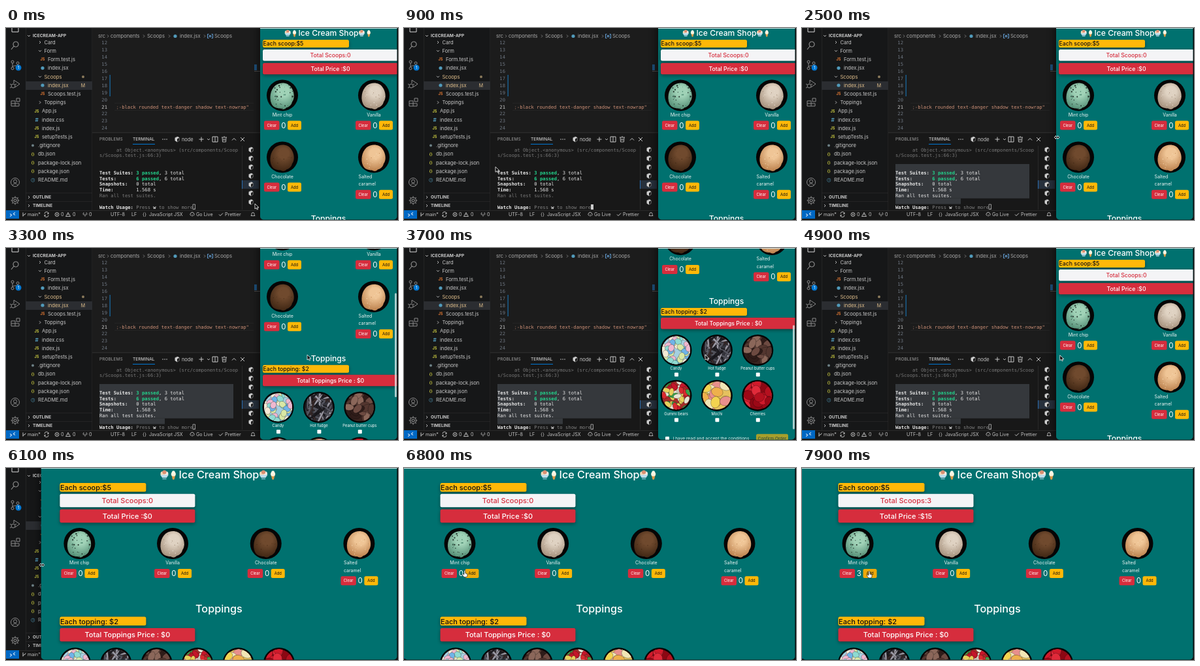
These frames come from a looping animation (600x295 px, 8 s). An HTML page with a canvas:

```html
<!DOCTYPE html>
<html lang="en">
<head>
<meta charset="utf-8">
<style>
html, body { margin: 0; width: 100%; height: 100%; overflow: hidden; background: #000; }
canvas { display: block; width: 600px; height: 295px; }
</style>
</head>
<body>
<canvas id="stage"></canvas>
<script>
const LOOP = 8000;
const SANS = 'Inter, "Liberation Sans", sans-serif';
const MONO = '"DejaVu Sans Mono", "Liberation Mono", monospace';
const TEAL = '#00716f', RED = '#d62d3d', YELLOW = '#ffb808', GREY = '#c5c5c5';
const canvas = document.getElementById('stage');
const c = canvas.getContext('2d');
const ratio = window.devicePixelRatio || 1;
canvas.width = 600 * ratio;
canvas.height = 295 * ratio;

const lerp = (a, b, k) => a + (b - a) * k;
const clamp = v => Math.max(0, Math.min(1, v));

function random(seed) {
  return () => (seed = (seed * 16807) % 2147483647) / 2147483647;
}

function text(s, x, y, size, color, { align = 'left', weight = 400, font = SANS } = {}) {
  c.font = `${weight} ${size}px ${font}`;
  c.textAlign = align;
  c.textBaseline = 'alphabetic';
  c.fillStyle = color;
  c.fillText(s, x, y + size * 0.36);
}

function rect(x, y, w, h, color, r = 0) {
  c.fillStyle = color;
  c.beginPath();
  c.roundRect(x, y, w, h, r);
  c.fill();
}

function disc(x, y, r, color) {
  c.fillStyle = color;
  c.beginPath();
  c.arc(x, y, r, 0, 7);
  c.fill();
}

function path(d, x, y, stroke, fill, width = 1) {
  const p = new Path2D(d);
  c.save();
  c.translate(x, y);
  c.lineWidth = width;
  if (fill) { c.fillStyle = fill; c.fill(p); }
  if (stroke) { c.strokeStyle = stroke; c.stroke(p); }
  c.restore();
}

function chevron(x, y, open, color = GREY) {
  path(open ? 'M-2-1L0 1L2-1' : 'M-1-2L1 0L-1 2', x, y, color, null, 0.9);
}

function cube(x, y) {
  path('M0-4L3.2-2.4V2L0 4L-3.2 2V-2.4Z', x, y, '#a5a5a5', '#181818', 0.6);
  path('M-3.2-2.2L1-4L3.2-2.4L0-.6V4L-3.2 2Z', x, y, null, '#d0d0d0');
}

// ---- Editor ----
// depth, icon, name, colour
const FILES = [
  [1, '>', 'Card'], [1, 'v', 'Form'], [2, 'test', 'Form.test.js'], [2, 'jsx', 'index.jsx'],
  [1, 'v', 'Scoops', '#e2c08d'], [2, 'jsx', 'index.jsx', '#e2c08d'], [2, 'test', 'Scoops.test.js'],
  [1, '>', 'Toppings'], [1, 'js', 'App.js'], [1, 'css', 'index.css'], [1, 'js', 'index.js'],
  [1, 'js', 'setupTests.js'], [0, 'dot', '.gitignore'], [0, 'json', 'db.json'],
  [0, 'json', 'package-lock.json'], [0, 'json', 'package.json'], [0, 'info', 'README.md']
];
const GLYPHS = {
  test: ['JS', '#e37933'], js: ['JS', '#cbcb41'], css: ['#', '#519aba'],
  json: ['{}', '#cbcb41'], info: ['ⓘ', '#519aba']
};

function activityBar() {
  const g = '#8b8b8b';
  path('M-5-6H2L5-3V3H-5Z', 14, 3, '#d7d7d7');
  path('M5-2A4 4 0 1 1-3-2A4 4 0 1 1 5-2M-2 1L-6 6', 14, 27, g, null, 1.2);
  path('M-2-5A2 2 0 1 1-6-5A2 2 0 1 1-2-5M-2 5A2 2 0 1 1-6 5A2 2 0 1 1-2 5M6-3A2 2 0 1 1 2-3A2 2 0 1 1 6-3M-4-3V3M4-1C4 2-4 0-4 3', 14, 57, g);
  disc(19, 61, 4.5, '#0078d4');
  text('1', 19, 61, 6, '#fff', { align: 'center' });
  path('M-2-1V-6L7 0L0 5M0 3A3 3 0 1 1-6 3A3 3 0 1 1 0 3M-8 0L-6 1M-8 6L-6 5M2 0L0 1', 14, 86, g);
  path('M-6-2H0V6H-6ZM-6 2H6V6H0M2-6H7V-1H2Z', 14, 114, g);
  path('M6.5 0A6.5 6.5 0 1 1-6.5 0A6.5 6.5 0 1 1 6.5 0M2.5-1.5A2.5 2.5 0 1 1-2.5-1.5A2.5 2.5 0 1 1 2.5-1.5M-4 5C-3 1 3 1 4 5', 14, 237, g);
  path('M2 0A2 2 0 1 1-2 0A2 2 0 1 1 2 0M4.5 0A4.5 4.5 0 1 1-4.5 0A4.5 4.5 0 1 1 4.5 0M0-6.5V-4.5M0 6.5V4.5M6.5 0H4.5M-6.5 0H-4.5M-4.6-4.6L-3.2-3.2M4.6 4.6L3.2 3.2M-4.6 4.6L-3.2 3.2M4.6-4.6L3.2-3.2', 14, 265, g, null, 1.2);
}

function sidebar() {
  rect(30, 82, 102, 13, '#2b2d31');
  chevron(35, 12, true);
  text('ICECREAM-APP', 41, 12, 6.6, '#ccc', { weight: 700 });
  FILES.forEach(([depth, icon, name, color = '#c8c8c8'], i) => {
    const y = 22 + i * 13.2, x = 41 + depth * 6 + (depth === 2 ? 3 : 0);
    if (icon === '>' || icon === 'v') {
      chevron(52, y, icon === 'v');
      text(name, 58.5, y, 7.6, color);
      return;
    }
    if (icon === 'jsx') disc(x, y, 2.6, '#519aba');
    else if (icon === 'dot') disc(x, y, 2, '#6d8086');
    else text(GLYPHS[icon][0], x, y, icon === 'css' ? 8 : 5.6, GLYPHS[icon][1], { align: 'center', weight: 700 });
    text(name, x + 8, y, 7.6, color);
  });
  disc(118, 75, 2, '#8b7a5c');
  text('M', 118, 88, 7, '#e2c08d', { align: 'center' });
  rect(30, 253, 102, 0.6, '#333');
  rect(30, 266.5, 102, 0.6, '#333');
  ['OUTLINE', 'TIMELINE'].forEach((s, i) => {
    chevron(35, 260 + i * 13, false);
    text(s, 41, 260 + i * 13, 6.4, '#ccc', { weight: 700 });
  });
}

function codePane() {
  rect(132, 0, 257, 161, '#1c1c1c');
  [['src', 141], ['components', 160], ['Scoops', 216], ['index.jsx', 266], ['Scoops', 319]]
    .forEach(([s, x]) => text(s, x, 12.5, 7.6, '#a9a9a9'));
  [156, 211, 250, 304].forEach(x => chevron(x, 12.5, false, '#888'));
  disc(259, 12.5, 2.6, '#519aba');
  path('M-2-3H-4V3H-2M2-3H4V3H2M-1.5-1H1.5V1H-1.5Z', 312.5, 12.5, '#75beff', null, 0.8);
  for (let n = 12; n <= 24; n++)
    text(n, 155, 121 + (n - 21) * 10.9, 7.2, n === 21 ? '#ccc' : '#6e7681', { align: 'right', font: MONO });
  rect(158.5, 72, 1.4, 33, '#1a6296');
  rect(166, 115.5, 213, 0.6, '#2c2c2c');
  rect(166, 126.5, 213, 0.6, '#2c2c2c');
  text(';-black rounded text-danger shadow text-nowrap"', 168.5, 121, 7.2, '#ce9178', { font: MONO });
  rect(168, 116, 2.5, 10, '#1c1c1c');
  rect(380, 56, 4, 9, '#1d4f7a');
  rect(380, 66, 9, 0.8, '#555');
}

function terminal(t, mouse) {
  rect(132, 161, 257, 119, '#181818');
  rect(132, 160.5, 257, 0.8, '#3a3a3a');
  text('PROBLEMS', 143, 171, 6.6, '#9d9d9d');
  text('TERMINAL', 194, 171, 6.6, '#e7e7e7');
  rect(194, 178, 34, 1, '#0078d4');
  [240, 243, 246].forEach(x => disc(x, 171, 0.8, GREY));
  cube(262, 171);
  text('node', 269, 171, 7.4, GREY);
  path('M-3.5 0H3.5M0-3.5V3.5', 299, 171, GREY);
  chevron(310, 171, true);
  path('M-4-4H4V4H-4ZM0-4V4', 320, 171, GREY);
  path('M-4-3H4M-3-3L-2.5 4H2.5L3-3M-1-4H1M-1-1V2M1-1V2', 334, 171, GREY, null, 0.9);
  path('M-3 1.5L0-1.5L3 1.5', 349, 171, GREY);
  path('M-3-3L3 3M3-3L-3 3', 362, 171, GREY);
  rect(361, 181, 0.7, 98, '#303030');
  rect(361, 234, 26, 13, '#26303c');
  rect(361, 234, 1, 13, '#2a6db0');
  for (let i = 0; i < 7; i++) cube(375, 187 + i * 13.4);

  const top = 182.6, pitch = 8.8;
  const drag = t >= 1000;
  const end = t < 1700 ? { x: mouse.x, row: Math.floor((mouse.y - top) / pitch) } : { x: 243, row: 9 };
  if (drag) {
    rect(143, top + 3 * pitch, 205, Math.max(0, end.row - 3) * pitch, '#35383c');
    rect(143, top + end.row * pitch, Math.max(0, end.x - 143), pitch, '#35383c');
  }
  const row = (i, ...parts) => {
    let col = 0;
    for (const [s, color, weight = 400] of parts) {
      text(s, 143 + col * 4.335, 187 + i * pitch, 7.2, color, { font: MONO, weight });
      col += s.length;
    }
  };
  const white = '#e5e5e5', green = '#23d18b';
  row(0, ['      at Object.<anonymous> (src/components/Scoop', '#777']);
  row(1, ['s/Scoops.test.js:66:3)', '#777']);
  row(4, ['Test Suites: ', white, 700], ['3 passed', green, 700], [', 3 total', white]);
  row(5, ['Tests:       ', white, 700], ['6 passed', green, 700], [', 6 total', white]);
  row(6, ['Snapshots:   ', white, 700], ['0 total', white]);
  row(7, ['Time:        ', white, 700], ['1.568 s', white]);
  row(8, ['Ran all test suites.', drag && end.row > 8 ? white : '#777']);
  row(10, ['Watch Usage: ', white, 700], ['Press ', '#808080'], ['w', white, 700], [' to show more.', '#808080']);
  if (t > 850 && t < 2300) rect(286, 271, 4, 8, '#ccc');
  else path('M0 0H3.5V7.5H0Z', 286, 271, '#bbb', null, 0.8);
}

function statusBar() {
  rect(0, 280, 600, 15, '#181818');
  rect(0, 280, 389, 0.7, '#303030');
  rect(0, 280, 20, 13, '#0068c4');
  path('M-4-1L-1 1L-4 3M4-3L1-1L4 1', 10, 286.5, '#fff');
  path('M-2-3V3M2-2C2 1-2 0-2 2', 28, 286.5, GREY);
  text('main*', 33, 286.5, 7.2, GREY);
  path('M3-1A3 3 0 0 0-3-1M-3 1A3 3 0 0 0 3 1M3-3V-1H1M-3 3V1H-1', 62, 286.5, GREY, null, 0.9);
  path('M3 0A3 3 0 1 1-3 0A3 3 0 1 1 3 0M-1.3-1.3L1.3 1.3M1.3-1.3L-1.3 1.3', 78, 286.5, GREY, null, 0.9);
  path('M0-3L3.5 3H-3.5ZM0-1V1', 95, 286.5, GREY, null, 0.9);
  path('M0-1V3M-2-3A3 3 0 0 0-2 1M2-3A3 3 0 0 1 2 1', 121, 286.5, GREY, null, 0.9);
  [['0', 84], ['0', 102], ['0', 127], ['UTF-8', 160], ['LF', 192], ['{}', 209],
    ['JavaScript JSX', 219], ['Go Live', 291], ['Prettier', 335]]
    .forEach(([s, x]) => text(s, x, 286.5, 7.2, GREY));
  path('M0 3V0M-2 2A3 3 0 1 1 2 2', 285, 286.5, GREY, null, 0.9);
  path('M-3 0L-1 2L3-2', 329, 286.5, GREY);
  path('M-3 2H3L2 0V-1A2 2 0 0 0-2-1V0Z', 378, 286.5, GREY, null, 0.9);
}

// ---- Shop page ----
// name, light, shade, specks, speck size
const SCOOPS = [
  ['Mint chip', '#a0d2b7', '#4f8b72', '#26382f', 1.1],
  ['Vanilla', '#dfd2c2', '#a08b76', '#efe6da', 0.6],
  ['Chocolate', '#704a2e', '#3c2412', '#5e3b22', 0.6],
  ['Salted caramel', '#efc596', '#b87c48', '#f7dcb7', 0.6]
];
// name, backdrop, pieces, piece length, piece width
const TOPPINGS = [
  ['Candy', '#a5cfe0', ['#6fb4e8', '#f0b8cf', '#d9e8a5', '#f4ead5', '#8edbd2'], 5.5, 4.5],
  ['Hot fudge', '#34343c', ['#1d1b20', '#55555f', '#9a98a3', '#3b2c2c'], 11, 1.6],
  ['Peanut butter cups', '#3a231f', ['#2f1c19', '#6d4a41', '#8b675a', '#53362f'], 8, 5],
  ['Gummi bears', '#a62c2a', ['#d92a2f', '#3aa149', '#e9d05c', '#e8e4d4', '#c5162a'], 6, 3.5],
  ['Mochi', '#e5c15e', ['#f3d350', '#e88f8c', '#f1e6b5', '#efb04c'], 9, 7],
  ['Cherries', '#8c0713', ['#d01a2b', '#9c0816', '#e02a3a', '#b5101f'], 8, 7]
];
const SCOOP_SHAPE = new Path2D('M-17 12C-20 5-19-8-11-15C-3-21 8-20 13-13C19-5 19 5 15 10C14 15 10 18 6 19C4 22 0 22-3 20C-9 20-15 18-17 12Z');

function scoopPhoto(x, y, [, light, shade, speck, size], seed) {
  disc(x, y, 24, '#050505');
  c.save();
  c.translate(x, y);
  c.clip(SCOOP_SHAPE);
  const glow = c.createRadialGradient(2, -6, 8, 0, -2, 25);
  glow.addColorStop(0, light);
  glow.addColorStop(1, shade);
  c.fillStyle = glow;
  c.fillRect(-25, -25, 50, 50);
  const rnd = random(seed);
  for (let i = 0; i < 40; i++) disc(rnd() * 38 - 19, rnd() * 40 - 19, size * (0.4 + rnd() * 0.7), i % 3 ? speck : shade);
  c.restore();
}

function toppingPhoto(x, y, [, base, colors, length, width], seed) {
  disc(x, y, 24, '#050505');
  c.save();
  c.beginPath();
  c.arc(x, y, 21.5, 0, 7);
  c.clip();
  c.fillStyle = base;
  c.fillRect(x - 24, y - 24, 48, 48);
  c.strokeStyle = 'rgba(0,0,0,.3)';
  c.lineWidth = 0.9;
  const rnd = random(seed);
  for (let i = 0; i < 1100 / (length * width); i++) {
    c.fillStyle = colors[i % colors.length];
    c.beginPath();
    c.ellipse(x + rnd() * 42 - 21, y + rnd() * 42 - 21, length, width, rnd() * 3, 0, 7);
    c.fill();
    c.stroke();
  }
  c.restore();
}

function sundae(x, y, s) {
  disc(x - s * 0.17, y - s * 0.12, s * 0.22, '#f3d9b8');
  disc(x + s * 0.17, y - s * 0.12, s * 0.22, '#f6eee4');
  disc(x, y - s * 0.26, s * 0.2, '#d98f72');
  path(`M${-s * .42} 0H${s * .42}L${s * .22} ${s * .3}H${-s * .22}Z`, x, y, null, '#b9dbea');
  rect(x - s * 0.2, y + s * 0.36, s * 0.4, s * 0.08, '#9cc7da');
}

function cone(x, y, s) {
  path(`M${-s * .2} 0H${s * .2}L${s * .08} ${s * .48}H${-s * .08}Z`, x, y, null, '#dc9a48');
  disc(x, y - s * 0.08, s * 0.23, '#fbf3df');
  disc(x, y - s * 0.25, s * 0.16, '#fff8e8');
}

function bar(x, y, w, h, color) {
  c.save();
  c.shadowColor = 'rgba(0,0,0,.4)';
  c.shadowBlur = 5 * ratio;
  c.shadowOffsetY = 2 * ratio;
  rect(x, y, w, h, color, 2.5);
  c.restore();
}

function innerWidth(w) {
  if (w < 253) return w - 10;
  return w < 337 ? 226 : w < 435 ? 305 : w < 526 ? 410 : 489;
}

function shop(edge, scroll, count, hover) {
  const w = 600 - edge, inner = innerWidth(w), k = clamp((w - 211) / 315);
  const left = w < 253 ? edge + 4 : edge + (w - inner) / 2;
  const mid = edge + w / 2 - 1;
  const titleSize = lerp(12.1, 16.2, k), size = lerp(8.7, 11, k);
  const barH = lerp(17.5, 20.5, k), tagH = lerp(12, 13.5, k);
  const label = (s, y, color) => text(s, left + 103.5, y + barH / 2, size, color, { align: 'center', weight: 500 });
  const tag = (s, y) => {
    bar(left, y, 132, tagH, YELLOW);
    text(s, left + 0.5, y + tagH / 2 + 0.3, size, '#111', { weight: 500 });
  };

  c.save();
  c.shadowColor = 'rgba(0,0,0,.75)';
  c.shadowBlur = 14 * ratio;
  rect(edge, -8, 598.5 - edge, 302.5, TEAL, 5);
  c.restore();
  c.save();
  c.beginPath();
  c.roundRect(edge, -8, 598.5 - edge, 302.5, 5);
  c.clip();
  c.translate(0, -scroll);

  const titleY = lerp(8, 10.5, k);
  text('Ice Cream Shop', mid, titleY, titleSize, '#fff', { align: 'center', weight: 500 });
  const half = titleSize * 3.8, e = titleSize * 0.9;
  sundae(mid - half - e * 1.5, titleY, e * 1.05);
  cone(mid - half - e * 0.55, titleY, e * 1.05);
  sundae(mid + half + e * 0.45, titleY, e * 1.05);
  cone(mid + half + e * 1.45, titleY, e * 1.05);

  tag('Each scoop:$5', lerp(18, 23, k));
  const totalY = lerp(33, 39.7, k), priceY = lerp(53.7, 63.6, k);
  bar(left, totalY, 207, barH, '#f4f4f6');
  label('Total Scoops:' + count, totalY, RED);
  bar(left, priceY, 207, barH, RED);
  label('Total Price :$' + count * 5, priceY, '#fff');

  const perRow = Math.min(4, Math.floor(inner / 70));
  const gap = (inner - 61) / (perRow - 1);
  const firstY = lerp(103.5, 116, k);
  let photoY;
  SCOOPS.forEach((scoop, i) => {
    const x = left + (i % perRow) * gap;
    photoY = firstY + Math.floor(i / perRow) * 95;
    scoopPhoto(x + 30, photoY, scoop, 31 + i * 977);
    let y = photoY + 29.8;
    if (i === 3) {
      text('Salted', x + 6.5, y, 7, '#eef5f4');
      y += 11.2;
      text('caramel', x + 6.5, y, 7, '#eef5f4');
    } else text(scoop[0], x + 30, y, 7, '#eef5f4', { align: 'center' });
    y += 16.3;
    rect(x + 2, y - 7, 23.5, 14, RED, 2.5);
    text('Clear', x + 13.7, y, 5.8, '#fff', { align: 'center' });
    text(i ? 0 : count, x + 31.8, y, 11.5, '#fff', { align: 'center' });
    rect(x + 38, y - 7, 21, 14, !i && hover ? '#eda90b' : YELLOW, 2.5);
    text('Add', x + 48.5, y, 5.8, '#111', { align: 'center' });
  });

  const headY = photoY + lerp(94.5, 100.5, k);
  text('Toppings', mid, headY, titleSize, '#fff', { align: 'center', weight: 500 });
  tag('Each topping: $2', headY + lerp(10.5, 12, k));
  const sumY = headY + lerp(25.5, 29.5, k);
  bar(left, sumY, 207, barH, RED);
  label('Total Toppings Price : $0', sumY, '#fff');

  const across = Math.min(6, Math.floor(inner / 62.4));
  let y;
  TOPPINGS.forEach((topping, i) => {
    const x = left + 23.5 + (i % across) * 62.4;
    y = headY + lerp(75.5, 83.5, k) + Math.floor(i / across) * 69.7;
    toppingPhoto(x, y, topping, 53 + i * 1409);
    text(topping[0], x, y + 28.3, 5.8, '#fff', { align: 'center' });
    rect(x - 2.5, y + 34.5, 6, 6, '#fff', 1);
  });
  rect(left + 7, y + 63, 6, 6, '#fff', 1);
  text('I have read and accept the conditions', left + 18.5, y + 66, 6.6, '#e4efee');
  rect(left + 146, y + 59, 49, 14, '#a69f2c', 2.5);
  text('Confirm Order', left + 170.5, y + 66, 6.4, '#26413b', { align: 'center' });
  c.restore();
  if (scroll > 0) rect(595, scroll * 0.56, 3, 160, 'rgba(225,235,235,.75)', 1.5);
  rect(edge, 0, 598.5 - edge, 1, '#d5e2e2');
}

// ---- Pointer and timing ----
const TRACK = [
  [0, 381, 270], [200, 381, 270], [850, 139.5, 213.5], [1000, 141, 213], [1700, 243, 267],
  [2400, 390, 168], [2750, 390, 168], [3000, 461, 164], [4200, 461, 164], [4800, 398, 168],
  [5050, 390, 160], [6100, 55, 149], [6350, 0, 149], [6850, 103, 163], [8000, 103, 163]
];
const SCROLL = [[0, 0], [2950, 0], [3550, 211.5], [3950, 211.5], [4600, 0], [8000, 0]];

function at(keys, t, col = 1) {
  const i = keys.findIndex(key => key[0] > t), a = keys[i - 1], b = keys[i];
  return lerp(a[col], b[col], (t - a[0]) / (b[0] - a[0]));
}

function pointer({ x, y }, t) {
  if (t > 2350 && t < 2780 || t > 5030 && t < 6380)
    path('M-4 0L-1.5-2.5V-1H1.5V-2.5L4 0L1.5 2.5V1H-1.5V2.5Z', x, y, '#fff', '#000', 0.8);
  else if (t > 6800)
    path('M-1-4C0-5 1-4 1-3V0L4 1V4L3 6H-1L-4 2L-3 1L-1 2Z', x, y, '#222', '#fff', 0.7);
  else
    path('M0 0V8L2 6.3L3.3 9L4.6 8.4L3.4 5.8H6Z', x, y, '#fff', '#000', 0.8);
}

function draw(now) {
  const t = now % LOOP;
  const mouse = { x: at(TRACK, t), y: at(TRACK, t, 2) };
  const edge = t < 5050 ? 389 : t < 6350 ? Math.max(0, mouse.x - 1) : 0;
  const count = [7000, 7300, 7600].filter(click => t >= click).length;
  c.setTransform(ratio, 0, 0, ratio, 0, 0);
  rect(0, 0, 600, 295, '#0a0a0a');
  rect(0, 0, 132, 295, '#161718');
  rect(30, 0, 0.7, 280, '#2b2b2b');
  rect(131.5, 0, 0.7, 280, '#2b2b2b');
  activityBar();
  sidebar();
  codePane();
  terminal(t, mouse);
  statusBar();
  shop(edge, at(SCROLL, t), count, t > 6800);
  pointer(mouse, t);
}

const start = performance.now();
function tick() {
  draw(performance.now() - start);
  requestAnimationFrame(tick);
}
tick();
</script>
</body>
</html>
```
